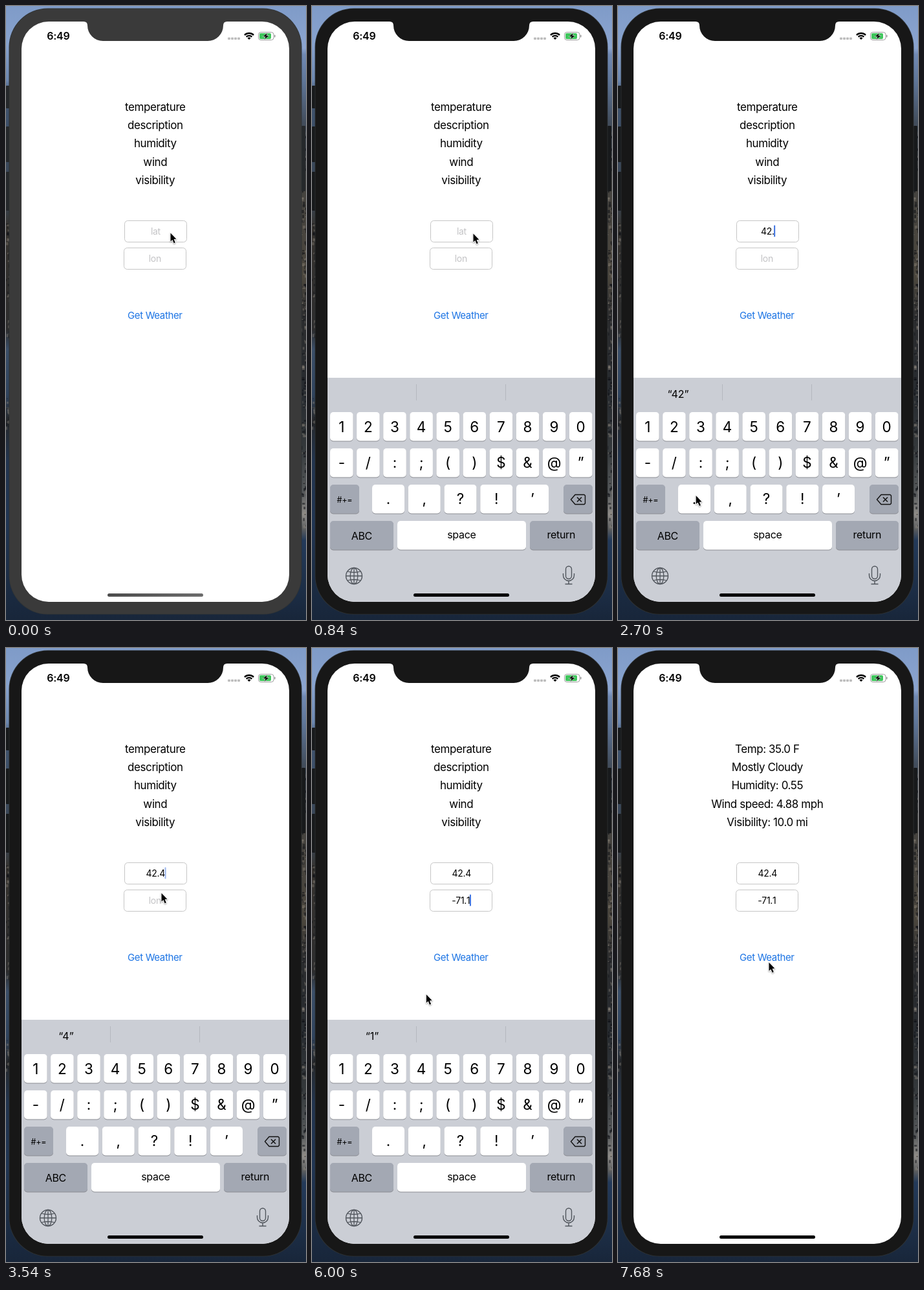
Recreate the animation shown at these times as an HTML page with a canvas. Size 464 by 948 pixels, loop 7740 ms.

```html
<!DOCTYPE html>
<html lang="en">
<head>
<meta charset="utf-8">
<title>Weather lookup</title>
<style>
html, body { margin: 0; width: 100%; height: 100%; overflow: hidden; background: #1b2b42; }
canvas { display: block; width: 464px; height: 948px; }
</style>
</head>
<body>
<canvas id="stage" width="464" height="948"></canvas>
<script>
const W = 464, H = 948, LOOP = 7740, STEP = 60;
const c = document.getElementById('stage').getContext('2d');
const SANS = 'Inter, "Liberation Sans", sans-serif';

const FOCUS_LAT = 300, FOCUS_LON = 3650, SUBMIT = 6250, RESULT = 6900;
const ACTIVE = 240, KB_SHOW = 360, KB_HIDE = 6282, KB_HEIGHT = 346;
const SUGGEST_LAG = 170;

// [time, text after the key press]
const latKeys = [[1900, '4'], [2300, '42'], [2660, '42.'], [3045, '42.4']];
const lonKeys = [[4170, '-'], [4590, '-7'], [5080, '-71'], [5420, '-71.'], [5730, '-71.1']];

// [time, x, y] of the pointer tip
const path = [
  [0, 254.5, 350], [240, 249.5, 351], [1020, 249.5, 351], [1680, 171.5, 644],
  [1920, 171.5, 644], [2240, 90, 646], [2320, 90, 646], [2600, 120, 757],
  [2680, 120, 757], [2980, 171, 646], [3080, 171, 646], [3540, 240.5, 378],
  [3700, 238, 382], [4100, 48, 703], [4190, 48, 703], [4520, 291, 646],
  [4620, 291, 646], [4990, 49, 646], [5070, 49, 646], [5400, 121, 757],
  [5460, 121, 757], [5680, 49, 646], [5760, 49, 646], [6140, 233.5, 485]
];

const clamp = v => Math.max(0, Math.min(1, v));
const ramp = (t, a, b) => clamp((t - a) / (b - a));
const smooth = p => p * p * (3 - 2 * p);
const easeOut = p => 1 - (1 - p) ** 3;
const last = (keys, t) => keys.filter(k => k[0] <= t).pop();

function text(s, x, y, size, { color = '#000', weight = 400, track = 0, kern = 'auto' } = {}) {
  c.font = `${weight} ${size}px ${SANS}`;
  c.letterSpacing = track + 'px';
  c.fontKerning = kern;
  c.textAlign = 'center';
  c.fillStyle = color;
  c.fillText(s, x + track / 2, y);
  return c.measureText(s).width;
}

function box(x, y, w, h, r, fill) {
  c.beginPath();
  c.roundRect(x, y, w, h, r);
  if (fill) {
    c.fillStyle = fill;
    c.fill();
  }
}

function line(color, width, draw) {
  c.beginPath();
  draw();
  c.strokeStyle = color;
  c.lineWidth = width;
  c.stroke();
}

function strip(x, w, stops) {
  const g = c.createLinearGradient(0, 0, 0, H);
  stops.forEach(([y, color]) => g.addColorStop(y / H, color));
  c.fillStyle = g;
  c.fillRect(x, 0, w, H);
}

function rocks(x, w, top, bottom, count, rnd) {
  for (let i = 0; i < count; i++) {
    c.fillStyle = rnd() < 0.55 ? 'rgba(14,16,20,.55)' : 'rgba(150,142,128,.35)';
    c.fillRect(x + rnd() * w, top + rnd() * (bottom - top), 1 + rnd() * 4, 1 + rnd() * 5);
  }
}

function wallpaper() {
  let seed = 11;
  const rnd = () => (seed = seed * 16807 % 2147483647) / 2147483647;
  strip(0, 232, [[0, '#7f9bc8'], [60, '#88a3ce'], [115, '#6c87b0'], [135, '#41546e'], [180, '#3c4f69'],
    [310, '#37404b'], [340, '#35322e'], [500, '#2c2c2d'], [530, '#3a4e68'],
    [600, '#2f435d'], [640, '#26282b'], [700, '#22344e'], [800, '#203553'], [948, '#18263a']]);
  strip(232, 232, [[0, '#7f9bc8'], [65, '#8ca5d0'], [75, '#7089b3'], [115, '#5f7699'], [180, '#424d5c'],
    [280, '#45433f'], [420, '#4b463d'], [480, '#2b2c2e'], [600, '#272b30'],
    [680, '#34383b'], [750, '#55585a'], [785, '#8f8c88'], [808, '#5a5c5e'], [825, '#233a5a'], [948, '#18263a']]);
  rocks(0, 8, 330, 510, 60, rnd);
  rocks(0, 8, 605, 650, 20, rnd);
  rocks(456, 8, 190, 810, 170, rnd);
}

function shell(active, frame) {
  const button = active ? '#17191b' : '#25282b';
  [[0, 123, 35], [0, 186, 55], [0, 256, 60], [457, 185, 101]].forEach(([x, y, h]) => box(x, y, 6, h, 1, button));
  box(4.5, 3.5, 453, 936, 60, '#2f3335');
  box(5.3, 4.3, 451.4, 934.4, 59.3, frame);
}

function notch(color) {
  c.beginPath();
  c.moveTo(119, 23);
  c.lineTo(120, 24);
  c.quadraticCurveTo(126, 24, 126, 30);
  c.arcTo(126, 54, 150, 54, 24);
  c.lineTo(312, 54);
  c.arcTo(336, 54, 336, 30, 24);
  c.quadraticCurveTo(336, 24, 342, 24);
  c.lineTo(343, 23);
  c.fillStyle = color;
  c.fill();
}

function statusBar() {
  text('6:49', 81, 52, 16, { weight: 600, track: -0.2 });
  for (let i = 0; i < 4; i++) box(343 + i * 5, 48.5, 4, 3.6, 1, '#bdbdbd');
  const a = Math.PI / 4;
  [10, 6.2].forEach(r => line('#000', 2.3, () => c.arc(376, 52, r, -Math.PI / 2 - a, -Math.PI / 2 + a)));
  c.beginPath();
  c.moveTo(376, 52);
  c.arc(376, 52, 3.6, -Math.PI / 2 - a, -Math.PI / 2 + a);
  c.fillStyle = '#000';
  c.fill();
  box(390.5, 40.5, 23.5, 12, 3.6);
  c.strokeStyle = '#9b9b9b';
  c.lineWidth = 1;
  c.stroke();
  box(392, 42, 18, 9, 2, '#3fc65c');
  box(415, 44.5, 1.5, 4, 1, '#9b9b9b');
  c.beginPath();
  [[404, 41.5], [397.5, 47.3], [401.5, 47.3], [400, 51.8], [406.5, 45.7], [402.6, 45.7]].forEach(p => c.lineTo(...p));
  c.closePath();
  c.strokeStyle = '#fff';
  c.stroke();
  c.fillStyle = '#000';
  c.fill();
}

function labels(t) {
  const rows = t < RESULT
    ? ['temperature', 'description', 'humidity', 'wind', 'visibility']
    : ['Temp: 35.0 F', 'Mostly Cloudy', 'Humidity: 0.55', 'Wind speed: 4.88 mph', 'Visibility: 10.0 mi'];
  rows.forEach((s, i) => text(s, 231, Math.round(162 + i * 28.2), 17, { track: -0.41 }));
}

function caretAlpha(age) {
  const p = age % 1100;
  return p < 600 ? 1 - ramp(p, 450, 540) : ramp(p, 950, 1100);
}

function field(x, y, hint, keys, from, to, t) {
  box(x, y, 96, 33, 5, '#fff');
  c.strokeStyle = '#c6c6c6';
  c.lineWidth = 1;
  c.stroke();
  const key = last(keys, t), mid = x + 48;
  const w = text(key ? key[1] : hint, mid, y + 21.5, 14, { track: -0.3, kern: 'none', color: key ? '#000' : '#c3c3c5' });
  if (t < from || t >= to) return;
  c.globalAlpha = caretAlpha(t - (key ? key[0] : from));
  box(key ? mid + w / 2 - 0.7 : mid - w / 2 - 1, y + 7, 2, 18, 1, '#3a70e0');
  c.globalAlpha = 1;
}

function button(t) {
  const fade = t < SUBMIT ? 0 : 1 - ramp(t, 6450, 6750);
  const mix = (a, b) => Math.round(a + (b - a) * fade);
  text('Get Weather', 230.5, 482.5, 15, { track: -0.36, color: `rgb(${mix(28, 214)},${mix(116, 214)},${mix(228, 216)})` });
}

function suggestion(t) {
  const at = t - SUGGEST_LAG;
  const key = t < FOCUS_LON ? last(latKeys, at) : last(lonKeys, at);
  return key ? key[1].match(/\d*$/)[0] : '';
}

function key(x, y, w, label, { size = 22.5, base = 31, dark = false } = {}) {
  box(x, y + 1, w, 44.5, 5, '#8b8d93');
  box(x, y, w, 44.5, 5, dark ? '#a3a8b3' : '#fff');
  text(label, x + w / 2, y + base, size, { track: size < 20 ? -0.3 : 0 });
}

function backspace() {
  c.lineJoin = 'round';
  line('#111', 1.4, () => {
    [[400.5, 762], [407, 754.5], [421, 754.5], [422.5, 756], [422.5, 768], [421, 769.5], [407, 769.5]].forEach(p => c.lineTo(...p));
    c.closePath();
  });
  line('#111', 1.5, () => {
    c.moveTo(410, 758.5); c.lineTo(417, 765.5);
    c.moveTo(417, 758.5); c.lineTo(410, 765.5);
  });
}

function globe() {
  const x = 65, y = 880, r = 12.5, ink = '#50555c';
  line(ink, 1.4, () => c.arc(x, y, r, 0, 7));
  line(ink, 1.3, () => c.ellipse(x, y, 5.8, r, 0, 0, 7));
  line(ink, 1.3, () => {
    c.moveTo(x, y - r); c.lineTo(x, y + r);
    c.moveTo(x - r, y); c.lineTo(x + r, y);
    c.moveTo(x - 10, y - 7); c.quadraticCurveTo(x, y - 4, x + 10, y - 7);
    c.moveTo(x - 10, y + 7); c.quadraticCurveTo(x, y + 4, x + 10, y + 7);
  });
}

function mic() {
  const ink = '#50555c';
  box(392.5, 865, 9, 19.5, 4.5);
  c.strokeStyle = ink;
  c.lineWidth = 1.4;
  c.stroke();
  line(ink, 1.4, () => {
    c.moveTo(388.5, 876);
    c.lineTo(388.5, 879);
    c.arc(397, 879, 8.5, Math.PI, 0, true);
    c.lineTo(405.5, 876);
    c.moveTo(397, 887.5); c.lineTo(397, 892.5);
    c.moveTo(391.5, 892.5); c.lineTo(402.5, 892.5);
  });
}

function keyboard(t) {
  const shown = easeOut(ramp(t, KB_SHOW, KB_SHOW + 420)) - easeOut(ramp(t, KB_HIDE, KB_HIDE + 300));
  if (shown <= 0) return;
  c.save();
  c.translate(0, Math.round(KB_HEIGHT * (1 - shown)));
  c.fillStyle = '#cbced5';
  c.fillRect(24, 574, 414, KB_HEIGHT);
  c.fillStyle = '#b5b8bf';
  c.fillRect(161, 584, 1, 25);
  c.fillRect(299, 584, 1, 25);
  const word = suggestion(t);
  if (word) text(`“${word}”`, 93, 605, 16);
  [...'1234567890'].forEach((s, i) => key(28 + i * 41.1, 627, 35.6, s));
  [...'-/:;()$&@”'].forEach((s, i) => key(28 + i * 41.1, 683, 35.6, s, { base: 30 }));
  key(28, 739, 45, '#+=', { size: 12.5, base: 27.5, dark: true });
  [...'.,?!’'].forEach((s, i) => key(93 + i * 55.75, 739, 50, s, { base: 30 }));
  key(389, 739, 45, '', { dark: true });
  backspace();
  key(28, 795, 98, 'ABC', { size: 16, base: 29, dark: true });
  key(132, 795, 199, 'space', { size: 16, base: 27 });
  key(337, 795, 97, 'return', { size: 16, base: 27, dark: true });
  globe();
  mic();
  c.restore();
}

function homeBar(active) {
  let fill = '#000';
  if (!active) {
    fill = c.createLinearGradient(157, 0, 305, 0);
    fill.addColorStop(0, '#4c4c4c');
    fill.addColorStop(1, '#6c6c6c');
  }
  box(157, 907, 148, 5, 2.5, fill);
}

function pointer(t) {
  let i = 0;
  while (i < path.length - 2 && path[i + 1][0] <= t) i++;
  const [t0, x0, y0] = path[i], [t1, x1, y1] = path[i + 1];
  const p = smooth(ramp(t, t0, t1));
  c.save();
  c.translate(x0 + (x1 - x0) * p - 0.5, y0 + (y1 - y0) * p);
  c.beginPath();
  [[0.5, 0.5], [0.5, 13.5], [3.4, 10.9], [5.6, 16.2], [7.8, 15.3], [5.6, 10.1], [9.4, 9.8]].forEach(q => c.lineTo(...q));
  c.closePath();
  c.lineJoin = 'round';
  c.shadowColor = 'rgba(0,0,0,.35)';
  c.shadowBlur = 2;
  c.shadowOffsetY = 1;
  c.strokeStyle = '#fff';
  c.lineWidth = 2;
  c.stroke();
  c.shadowColor = 'transparent';
  c.fillStyle = '#000';
  c.fill();
  c.restore();
}

function draw(t) {
  const active = t >= ACTIVE, frame = active ? '#171717' : '#3a3a3a';
  wallpaper();
  shell(active, frame);
  c.save();
  box(24, 24, 414, 896, 42, '#fff');
  c.clip();
  statusBar();
  labels(t);
  field(183.5, 331.5, 'lat', latKeys, FOCUS_LAT, FOCUS_LON, t);
  field(182.5, 373.5, 'lon', lonKeys, FOCUS_LON, SUBMIT, t);
  button(t);
  keyboard(t);
  homeBar(active);
  c.restore();
  notch(frame);
  pointer(t);
}

const start = performance.now();
function tick() {
  const t = (performance.now() - start) % LOOP;
  draw(Math.floor(t / STEP) * STEP);
  requestAnimationFrame(tick);
}
tick();
</script>
</body>
</html>
```
